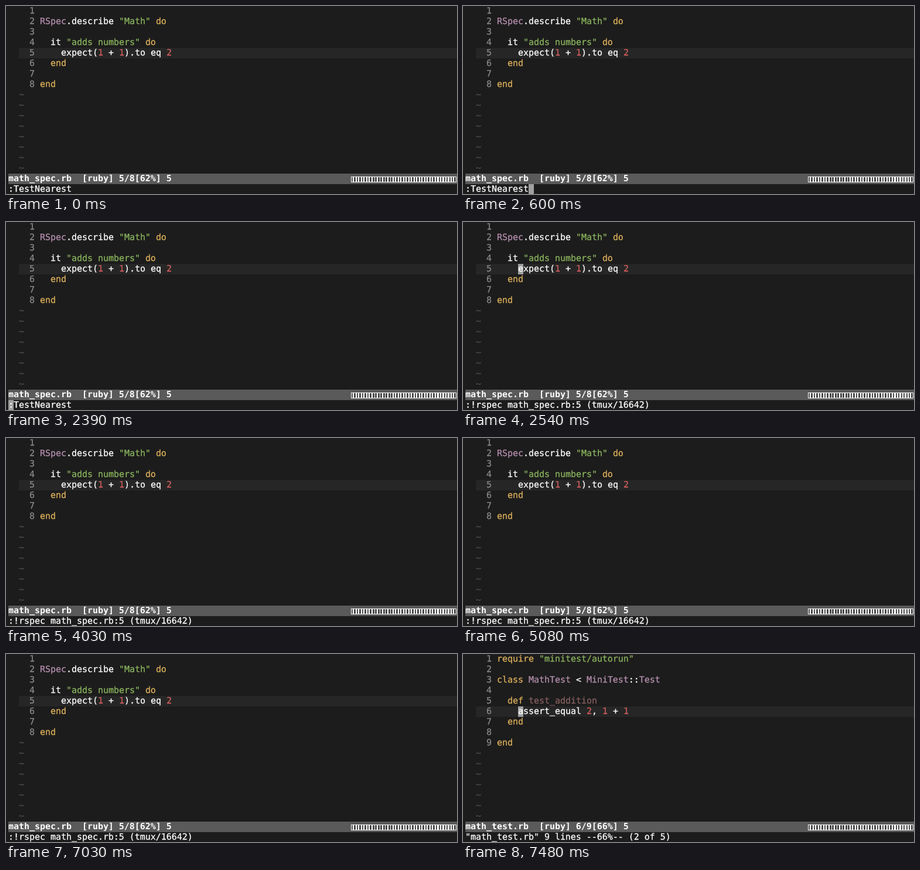
An HTML page for the animation above (8000 ms loop, 770 by 323 pixels).

```html
<!DOCTYPE html>
<html lang="en">
<head>
<meta charset="utf-8">
<title>Vim test run</title>
<style>
  html, body { margin: 0; width: 100%; height: 100%; overflow: hidden; background: #1c1c1c; }
  .stage { position: relative; width: 770px; height: 323px; overflow: hidden; }
  .stage > *, .screen > * { position: absolute; }
  .screen { left: 0; top: -1px; width: 100%; height: 100%; }
  pre {
    margin: 0; left: 4px; top: 0; color: #fff;
    font: 14.95px/18px "DejaVu Sans Mono", monospace;
    text-rendering: geometricPrecision;
    -webkit-text-stroke: 0.3px;
  }
  .line { left: 22px; right: 0; height: 18px; background: #262626; }
  .bar { left: 4px; right: 0; top: 288px; height: 18px; background: #5a5a5a; }
  .status { top: 288px; font-weight: bold; -webkit-text-stroke: 0; }
  .cmd { top: 306px; }

  /* row of narrow hollow boxes */
  .boxes {
    left: 589px; top: 293px; width: 180px; height: 10px; box-sizing: border-box;
    border: solid #fff; border-width: 1px 0;
    background: repeating-linear-gradient(90deg, #fff 0 1px, #4a4a4a 1px 3.5px, #fff 3.5px 4.5px);
  }

  .n { color: #8a8a8a; }
  .t { color: #4e4e4e; }
  .k { color: #dcb05c; }
  .c { color: #b48ead; }
  .s { color: #8bb45e; }
  .d { color: #d75f5f; }
  .f { color: #875f5f; }

  .cursor {
    left: 0; top: 0; width: 9px; height: 18px; background: #a0a0a0;
    animation: blink 8s step-end infinite, jump 8s step-end infinite;
  }
  @keyframes blink {
    0%, 13.125%, 26.125%, 50.375%, 63.5%, 74.75%, 87.875% { opacity: 0; }
    7.5%, 18.75%, 29.875%, 56%, 69.125%, 82.25%, 93.5%, 100% { opacity: 1; }
  }
  @keyframes jump {
    0% { transform: translate(112px, 306px); }
    29.875% { transform: translate(4px, 306px); }
    31.75% { transform: translate(94px, 72px); }
    93.5%, 100% { transform: translate(94px, 90px); }
  }

  .spec { animation: spec 8s step-end infinite; }
  .unit { animation: unit 8s step-end infinite; }
  .typed { animation: typed 8s step-end infinite; }
  .run { animation: run 8s step-end infinite; }
  @keyframes spec { 0% { opacity: 1; } 93.5%, 100% { opacity: 0; } }
  @keyframes unit { 0% { opacity: 0; } 93.5%, 100% { opacity: 1; } }
  @keyframes typed { 0% { opacity: 1; } 31.75%, 100% { opacity: 0; } }
  @keyframes run { 0% { opacity: 0; } 31.75%, 100% { opacity: 1; } }
</style>
</head>
<body>
<div class="stage">
  <div class="bar"></div>
  <div class="boxes"></div>
  <div class="line spec" style="top:72px"></div>
  <div class="line unit" style="top:90px"></div>
  <div class="cursor"></div>

  <div class="screen spec">
    <pre class="code">
<!---->
<span class="c">RSpec</span>.describe <span class="s">"Math"</span> <span class="k">do</span>

  it <span class="s">"adds numbers"</span> <span class="k">do</span>
    expect(<span class="d">1</span> + <span class="d">1</span>).to eq <span class="d">2</span>
  <span class="k">end</span>

<span class="k">end</span></pre>
    <pre class="status">math_spec.rb  [ruby] 5/8[62%] 5</pre>
    <pre class="cmd typed">:TestNearest</pre>
    <pre class="cmd run">:!rspec math_spec.rb:5 (tmux/16642)</pre>
  </div>

  <div class="screen unit">
    <pre class="code"><span class="k">require</span> <span class="s">"minitest/autorun"</span>

<span class="k">class</span> <span class="c">MathTest</span> &lt; <span class="c">MiniTest</span>::<span class="c">Test</span>

  <span class="k">def</span> <span class="f">test_addition</span>
    assert_equal <span class="d">2</span>, <span class="d">1</span> + <span class="d">1</span>
  <span class="k">end</span>

<span class="k">end</span></pre>
    <pre class="status">math_test.rb  [ruby] 6/9[66%] 5</pre>
    <pre class="cmd">"math_test.rb" 9 lines --66%-- (2 of 5)</pre>
  </div>
</div>
<script>
  // Line numbers beside the code, tildes below it, 16 rows in all.
  const ROWS = 16;
  for (const code of document.querySelectorAll(".code")) {
    code.style.left = "58px";
    const count = code.textContent.split("\n").length;
    const gutter = document.createElement("pre");
    gutter.innerHTML = Array.from({ length: ROWS }, (_, i) =>
      i < count ? `<span class="n">${String(i + 1).padStart(5)}</span>`
                : `<span class="t">  ~</span>`).join("\n");
    code.before(gutter);
  }
</script>
</body>
</html>
```
